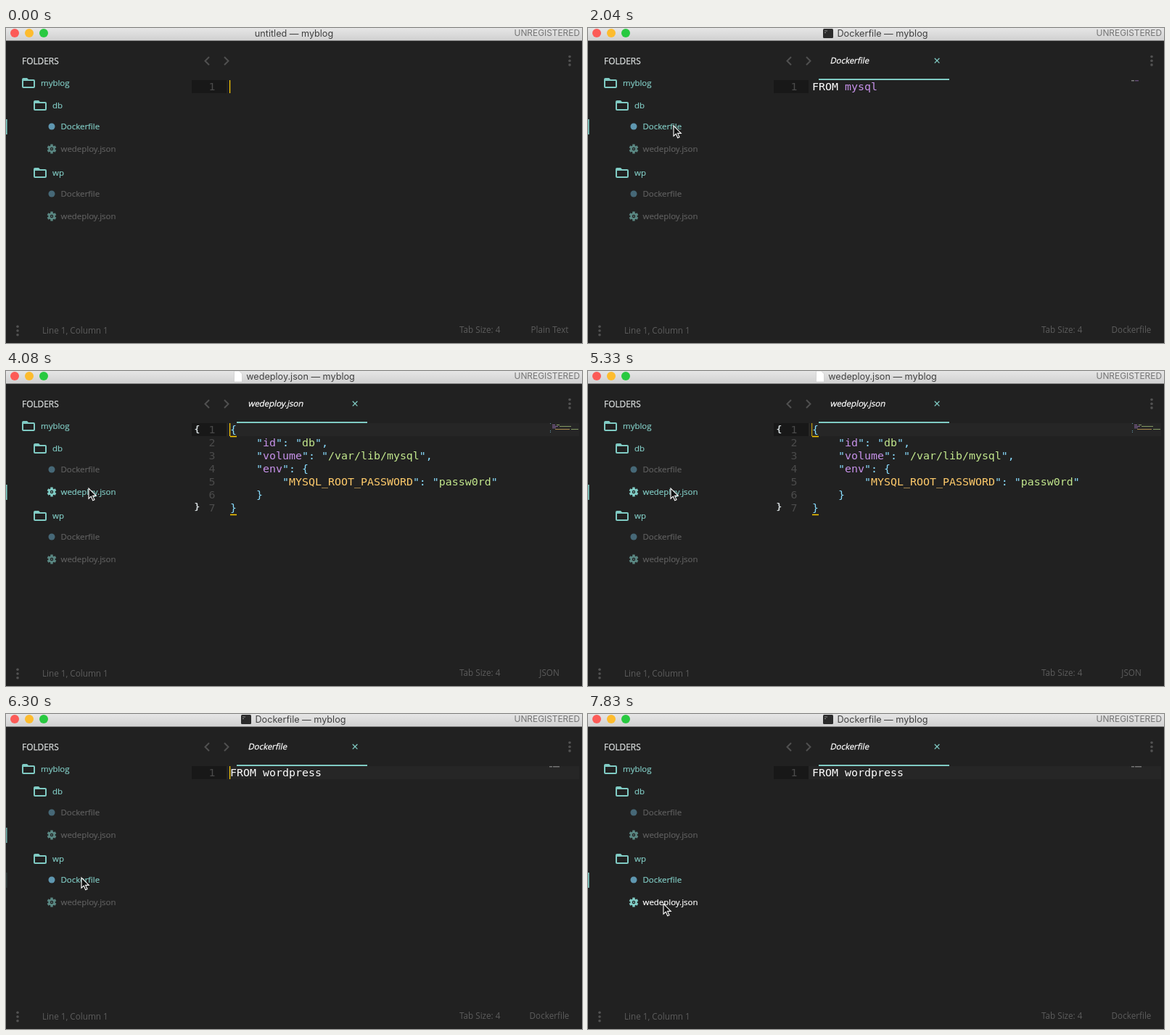
An HTML page that plays this animation: 794 px wide and 435 px high, repeating every 8 s.

```html
<!DOCTYPE html>
<html lang="en">
<head>
<meta charset="utf-8">
<title>Code editor</title>
<style>
html, body { margin: 0; width: 100%; height: 100%; overflow: hidden; background: #212121; }
svg { display: block; width: 794px; height: 435px; }
:root { --teal: #80cbc4; --gray: #5f5f5f; }

text { font: 11.45px "Open Sans", "Noto Sans", sans-serif; }
.title { font: 12.65px Inter, sans-serif; fill: #404040; text-anchor: middle; }
.note { font: 11.9px Inter, sans-serif; fill: #747474; text-anchor: end; }
.heading { font-size: 11.9px; fill: #d8dcdc; stroke: #d8dcdc; stroke-width: .25px; }
.status { font-size: 11.7px; fill: #5c5c5c; }
.mid { text-anchor: middle; }
.code text { font: 14.95px "DejaVu Sans Mono", monospace; fill: #89ddff; }
.code .num { fill: #4b4b4b; text-anchor: end; }
.code .fold { font-size: 13px; font-weight: bold; fill: #d5dcde; }
.code .white, .white { fill: #fff; }
.key { fill: #c792ea; }
.sub { fill: #ffcb6b; }
.str { fill: #c3e88d; }
.tab text { fill: #fff; stroke: #fff; stroke-width: .25px; }
.tab path { stroke: var(--teal); stroke-width: 1.3; }
.tab rect, .bar, .folder { fill: var(--teal); }
.dots { fill: #525252; }

.row { color: var(--gray); --lit: .6; }
.row text { fill: currentColor; stroke: currentColor; stroke-width: .2px; }
.row use { opacity: var(--lit); }
.open { color: var(--teal); }

/* Every part changes in steps on one shared eight second clock. */
.anim { animation: 8s step-end infinite; }
.s1 { animation-name: s1; } .s2 { animation-name: s2; }
.s3 { animation-name: s3; } .s4 { animation-name: s4; }
.t2 { animation-name: t2; }
.bar1 { animation-name: bar1; } .bar2 { animation-name: bar2; } .bar3 { animation-name: bar3; }
.dbDocker { animation-name: dbDocker; } .dbJson { animation-name: dbJson; }
.wpDocker { animation-name: wpDocker; } .wpJson { animation-name: wpJson; }
.fill { animation-name: fill; }
.caret { animation-name: caret; fill: #ffcc00; }
.pointer { animation-name: pointer; }

@keyframes s1 { 0% { opacity: 1 } 21%, 100% { opacity: 0 } }
@keyframes s2 { 0% { opacity: 0 } 21% { opacity: 1 } 48.75%, 100% { opacity: 0 } }
@keyframes s3 { 0% { opacity: 0 } 48.75% { opacity: 1 } 78.75%, 100% { opacity: 0 } }
@keyframes s4 { 0% { opacity: 0 } 78.75%, 100% { opacity: 1 } }
@keyframes t2 { 0% { opacity: 0 } 24.375% { opacity: .5 } 25.5%, 100% { opacity: 1 } }

@keyframes bar1 { 0% { opacity: 1 } 48.75% { opacity: .8 } 49.875% { opacity: .3 } 51%, 100% { opacity: 0 } }
@keyframes bar2 {
  0% { opacity: 0 } 48.75% { opacity: .15 } 49.875% { opacity: .6 } 51% { opacity: 1 }
  78.75% { opacity: .8 } 79.875% { opacity: .3 } 81%, 100% { opacity: 0 }
}
@keyframes bar3 { 0% { opacity: 0 } 78.75% { opacity: .15 } 79.875% { opacity: .6 } 81%, 100% { opacity: 1 } }

@keyframes dbDocker {
  0% { color: var(--teal); --lit: 1 }
  48.75%, 100% { color: var(--gray); --lit: .6 }
}
@keyframes dbJson {
  0% { color: var(--gray); --lit: .6 }
  15.5% { color: #888; --lit: .7 }
  16.625% { color: #999; --lit: .75 }
  17.75% { color: #777; --lit: .65 }
  18.875% { color: var(--gray); --lit: .6 }
  40% { color: #8f8f8f; --lit: .7 }
  41% { color: #bfbfbf; --lit: .85 }
  42.125% { color: #e6e6e6; --lit: .95 }
  43.25% { color: #fff; --lit: 1 }
  48.75% { color: var(--teal); --lit: 1 }
  78.75%, 100% { color: var(--gray); --lit: .6 }
}
@keyframes wpDocker {
  0% { color: var(--gray); --lit: .6 }
  72.125% { color: #8f8f8f; --lit: .7 }
  73.25% { color: #bfbfbf; --lit: .85 }
  74.375% { color: #e6e6e6; --lit: .95 }
  75.5% { color: #fff; --lit: 1 }
  78.75%, 100% { color: var(--teal); --lit: 1 }
}
@keyframes wpJson {
  0% { color: var(--gray); --lit: .6 }
  94.5% { color: #8f8f8f; --lit: .7 }
  95.625% { color: #bfbfbf; --lit: .85 }
  96.75% { color: #e6e6e6; --lit: .95 }
  97.875%, 100% { color: #fff; --lit: 1 }
}
@keyframes fill {
  0% { opacity: 0 } 13.375% { opacity: .5 } 14.375% { opacity: 1 } 15.5% { opacity: .6 }
  16.625% { opacity: .2 } 17.75% { opacity: 0 }
  69.875% { opacity: .5 } 71% { opacity: 1 } 72.125% { opacity: .7 }
  73.25% { opacity: .3 } 74.375%, 100% { opacity: 0 }
}
@keyframes caret {
  0% { opacity: 1 } 3.375% { opacity: .5 } 4.5% { opacity: 0 }
  11.125% { opacity: .5 } 12.25% { opacity: 1 } 16.625% { opacity: .5 } 17.75% { opacity: 0 }
  48.75% { opacity: 1 } 54.375% { opacity: .5 } 55.5% { opacity: 0 }
  61.125% { opacity: .4 } 62.25% { opacity: .9 } 64.375% { opacity: 1 }
  66.625% { opacity: .7 } 67.75% { opacity: 0 }
  73.25% { opacity: .4 } 74.375% { opacity: .9 } 75.5% { opacity: 1 }
  83.25% { opacity: .5 } 84.375% { opacity: .1 } 86.625% { opacity: 0 }
  91.125% { opacity: .5 } 92.25% { opacity: 1 } 96.75% { opacity: .5 } 97.875%, 100% { opacity: 0 }
}
@keyframes pointer {
  0% { transform: translate(-30px, 0) }
  12.25% { transform: translate(240px, 236px) }
  13.375% { transform: translate(212px, 211px) }
  14.375% { transform: translate(184px, 189px) }
  15.5% { transform: translate(160px, 170px) }
  16.625% { transform: translate(140px, 154px) }
  17.75% { transform: translate(126px, 143px) }
  18.875% { transform: translate(119px, 137px) }
  19.875% { transform: translate(118px, 135px) }
  36.625% { transform: translate(118px, 137px) }
  37.75% { transform: translate(117px, 142px) }
  38.875% { transform: translate(116px, 148px) }
  40% { transform: translate(115px, 154px) }
  41% { transform: translate(114px, 159px) }
  42.125% { transform: translate(114px, 162px) }
  67.75% { transform: translate(114px, 166px) }
  68.875% { transform: translate(113px, 176px) }
  69.875% { transform: translate(111px, 188px) }
  71% { transform: translate(109px, 200px) }
  72.125% { transform: translate(107px, 212px) }
  73.25% { transform: translate(105px, 221px) }
  74.375% { transform: translate(104px, 226px) }
  92.25% { transform: translate(104px, 230px) }
  93.375% { transform: translate(104px, 238px) }
  94.5% { transform: translate(104px, 248px) }
  95.625% { transform: translate(104px, 257px) }
  96.75%, 100% { transform: translate(104px, 262px) }
}
</style>
</head>
<body>
<svg viewBox="0 0 794 435">
  <defs>
    <linearGradient id="chrome" x2="0" y2="1">
      <stop stop-color="#e6e6e6"/><stop offset="1" stop-color="#d0d0d0"/>
    </linearGradient>
    <path id="folder" fill-rule="evenodd" d="M7 0H2Q0 0 0 2V12Q0 14 2 14H16Q18 14 18 12V4Q18 2 16 2H9ZM2 4H16V12H2Z"/>
    <g id="gear">
      <path d="M0-6.4V6.4M-5.5-3.2 5.5 3.2M-5.5 3.2 5.5-3.2" stroke="#80cbc4" stroke-width="3.4"/>
      <circle r="4.7" fill="#80cbc4"/>
      <circle r="2.2" fill="#212121"/>
      <circle r=".9" fill="#80cbc4"/>
    </g>
    <circle id="dot" r="4.5" fill="#5f97b0"/>
    <g id="dots"><circle r="1.8"/><circle cy="5.7" r="1.8"/><circle cy="11.4" r="1.8"/></g>
    <path id="close" d="M477.8 41.8l6.6 6.6m0-6.6l-6.6 6.6"/>
    <g id="terminal">
      <rect x="324" y="1" width="14" height="13" rx="1.5" fill="#2b2b2b"/>
      <path d="M326 4h4M326 6.5h2" stroke="#8a8a8a"/>
    </g>
  </defs>

  <rect width="794" height="435" fill="#212121"/>
  <rect width="794" height="17.5" fill="url(#chrome)"/>
  <circle cx="12" cy="7" r="6" fill="#fc5b57"/>
  <circle cx="32" cy="7" r="6" fill="#fdbc2e"/>
  <circle cx="52" cy="7" r="6" fill="#28c940"/>
  <text class="note" x="791" y="11">UNREGISTERED</text>

  <text class="heading" x="22" y="50">FOLDERS</text>
  <path d="M280 40l-5.5 5.5 5.5 5.5M301 40l5.5 5.5-5.5 5.5" fill="none" stroke="#505050" stroke-width="2"/>
  <g class="dots"><use href="#dots" x="777" y="39.5"/><use href="#dots" x="16" y="412.3"/></g>
  <text class="status" x="50" y="422">Line 1, Column 1</text>
  <text class="status" x="625" y="421">Tab Size: 4</text>

  <g class="folder">
    <use href="#folder" x="22" y="69"/>
    <use href="#folder" x="38" y="100"/>
    <use href="#folder" x="38" y="193"/>
    <rect class="anim fill" x="40" y="197" width="14" height="8"/>
  </g>
  <g class="row open">
    <text x="48" y="80">myblog</text>
    <text x="64" y="111">db</text>
    <text x="64" y="204">wp</text>
  </g>
  <g class="row anim dbDocker"><use href="#dot" x="63" y="136"/><text x="75.5" y="140">Dockerfile</text></g>
  <g class="row anim dbJson"><use href="#gear" x="63" y="167"/><text x="75.5" y="171">wedeploy.json</text></g>
  <g class="row anim wpDocker"><use href="#dot" x="63" y="229"/><text x="75.5" y="233">Dockerfile</text></g>
  <g class="row anim wpJson"><use href="#gear" x="63" y="260"/><text x="75.5" y="264">wedeploy.json</text></g>
  <rect class="bar anim bar1" y="126" width="1.6" height="21"/>
  <rect class="bar anim bar2" y="157" width="1.6" height="21"/>
  <rect class="bar anim bar3" y="219" width="1.6" height="21"/>

  <rect x="256" y="72" width="48" height="18" fill="#181818"/>
  <g class="code"><text class="num" x="288.5" y="86">1</text></g>

  <g class="anim s1">
    <text class="title" x="397" y="11.7">untitled — myblog</text>
    <text class="status mid" x="749.5" y="421">Plain Text</text>
  </g>

  <g class="anim s2">
    <use href="#terminal"/>
    <text class="title" x="406" y="11.7">Dockerfile — myblog</text>
    <text class="status mid" x="749" y="421">Dockerfile</text>
    <g class="tab anim t2">
      <text transform="translate(333.5 48.5) skewX(-12)">Dockerfile</text>
      <use href="#close"/><path d="M477.8 41.8l6.6 6.6m0-6.6l-6.6 6.6"/>
      <rect x="318" y="70" width="180" height="2"/>
    </g>
    <g class="code"><text class="white" x="309" y="86">FROM <tspan class="key">mysql</tspan></text></g>
    <path d="M749 72.8h4" stroke="#aaa"/><path d="M754 72.8h5" stroke="#80609a"/>
  </g>

  <g class="anim s3">
    <rect x="304" y="72" width="486" height="18" fill="#262626"/>
    <path d="M314.500 0h7l4 4v11h-11z" fill="#fff" stroke="#c4c4c4" stroke-width=".6"/>
    <text class="title" x="406" y="11.7">wedeploy.json — myblog</text>
    <text class="status mid" x="749" y="421">JSON</text>
    <g class="tab">
      <text transform="translate(333.5 48.5) skewX(-12)">wedeploy.json</text>
      <path d="M477.8 41.8l6.6 6.6m0-6.6l-6.6 6.6"/>
      <rect x="318" y="70" width="180" height="2"/>
    </g>
    <g class="code">
      <text class="fold" x="259.500" y="85">{</text>
      <text class="fold" x="259.500" y="192">}</text>
      <text class="num" x="288.5" y="104">2</text>
      <text class="num" x="288.5" y="122">3</text>
      <text class="num" x="288.5" y="140">4</text>
      <text class="num" x="288.5" y="158">5</text>
      <text class="num" x="288.5" y="176">6</text>
      <text class="num" x="288.5" y="194">7</text>
      <text x="309" y="86">{</text>
      <text x="345" y="104">"<tspan class="key">id</tspan>": "<tspan class="str">db</tspan>",</text>
      <text x="345" y="122">"<tspan class="key">volume</tspan>": "<tspan class="str">/var/lib/mysql</tspan>",</text>
      <text x="345" y="140">"<tspan class="key">env</tspan>": {</text>
      <text x="381" y="158">"<tspan class="sub">MYSQL_ROOT_PASSWORD</tspan>": "<tspan class="str">passw0rd</tspan>"</text>
      <text x="345" y="176">}</text>
      <text x="309" y="194">}</text>
    </g>
    <path d="M309 90.500h9M309 198.500h9" stroke="#ffcc00" stroke-width="1.5"/>
    <g stroke-width="1" opacity=".6">
      <path d="M750 72.500h1M750 82.500h1M750 84.500h1" stroke="#89ddff"/>
      <path d="M753 74.500h4M753 76.500h8M753 78.500h5" stroke="#c792ea"/>
      <path d="M759 74.500h4M763 76.500h16M779 80.500h10" stroke="#c3e88d"/>
      <path d="M757 80.500h20" stroke="#ffcb6b"/>
    </g>
  </g>

  <g class="anim s4">
    <rect x="304" y="72" width="486" height="18" fill="#262626"/>
    <use href="#terminal"/>
    <text class="title" x="406" y="11.7">Dockerfile — myblog</text>
    <text class="status mid" x="749" y="421">Dockerfile</text>
    <g class="tab">
      <text transform="translate(333.5 48.5) skewX(-12)">Dockerfile</text>
      <path d="M477.8 41.8l6.6 6.6m0-6.6l-6.6 6.6"/>
      <rect x="318" y="70" width="180" height="2"/>
    </g>
    <g class="code"><text class="white" x="309" y="86">FROM wordpress</text></g>
    <path d="M749 72.8h4m1 0h9" stroke="#999"/>
  </g>

  <rect class="anim caret" x="308" y="72" width="1.2" height="18"/>
  <path class="anim pointer" d="M0 0V14.2L3.3 11.2 5.700 16.700 8 15.700 5.600 10.400H10.300Z" fill="#111" stroke="#fff" stroke-width="1.1"/>
</svg>
</body>
</html>
```
